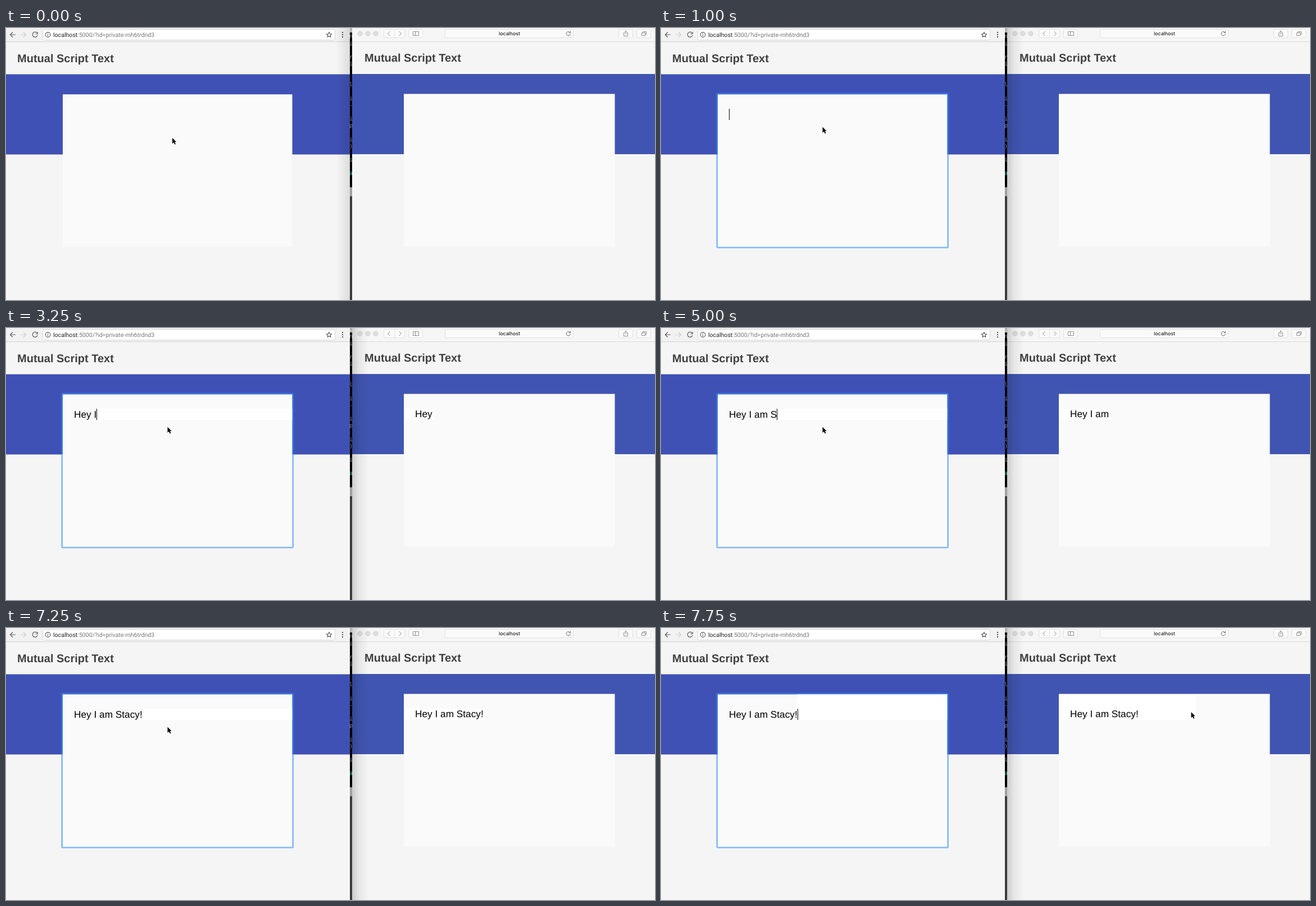
Write an HTML page that moves like this. It is 1155x485 px and loops after 8000 ms.

```html
<!DOCTYPE html>
<html lang="en">
<head>
<meta charset="utf-8">
<title>Shared editor</title>
<style>
  html, body { margin: 0; width: 100%; height: 100%; overflow: hidden; background: #f5f5f5; }
  svg { display: block; width: 1155px; height: 485px; }
  text { white-space: pre; font-kerning: none; text-rendering: geometricPrecision; }
  .title { font: bold 20px "Liberation Sans", Arial, sans-serif; fill: #404040; }
  .body { font: 17.25px "Liberation Sans", Arial, sans-serif; fill: #000; }
  .url { font: 10.6px Roboto, sans-serif; fill: #777; }
  .host { font: 500 8.7px Inter, sans-serif; fill: #222; text-anchor: middle; }
  .term { font: 10px "DejaVu Sans Mono", monospace; fill: #8a8a8a; }
  .icon { fill: none; stroke: #5f5f5f; stroke-width: 1.2; }
  .pale { stroke: #cfcfcf; }
  .thin { stroke: #8e8e8e; stroke-width: 1; }
  .button { fill: #fafafa; stroke: #e2e2e2; }
</style>
</head>
<body>
<svg viewBox="0 0 1155 485">
  <defs>
    <linearGradient id="fadeOut"><stop stop-color="#000" stop-opacity=".17"/><stop offset=".4" stop-color="#000" stop-opacity=".06"/><stop offset="1" stop-color="#000" stop-opacity="0"/></linearGradient>
    <linearGradient id="fadeIn"><stop stop-color="#000" stop-opacity="0"/><stop offset="1" stop-color="#000" stop-opacity=".1"/></linearGradient>
    <clipPath id="gap"><rect x="612" y="8" width="4" height="276"/></clipPath>
  </defs>

  <!-- left window -->
  <rect width="612" height="485" fill="#f5f5f5"/>
  <rect width="612" height="24" fill="#f2f2f2"/>
  <rect y="24" width="612" height="1" fill="#d3d3d3"/>
  <rect x="65.5" y="2.5" width="520" height="19" rx="3" fill="#fff" stroke="#d6d6d6"/>
  <path class="icon" d="M17 12H8M12 7.5L7.5 12L12 16.500"/>
  <path class="icon pale" d="M26 12H35M31 7.500L35.500 12L31 16.500"/>
  <path class="icon" d="M55.300 9A4.500 4.500 0 1 0 56 13M56.300 7V10.500H52.800"/>
  <circle class="icon" cx="74.500" cy="12" r="4.300" stroke-width="1"/>
  <path class="icon" d="M74.500 11.500V14.500M74.500 9.300V10.500"/>
  <text class="url" x="84" y="15.700"><tspan fill="#222">localhost</tspan>:5000/?id=private-mh6trdnd3</text>
  <path id="star" class="icon" stroke-linejoin="round" stroke-width="1"/>
  <g fill="#5f5f5f"><circle cx="599" cy="8" r="1.200"/><circle cx="599" cy="12" r="1.200"/><circle cx="599" cy="16" r="1.200"/></g>
  <text class="title" x="20" y="61">Mutual Script Text</text>
  <rect y="82.500" width="612" height="143" fill="#3f51b5"/>
  <rect x="101" y="118.300" width="408.500" height="272" fill="#fafafa"/>
  <rect id="leftStrip" y="144" height="20" fill="#fff"/>
  <rect id="patch" x="286" y="194" width="19" height="22" fill="#fff"/>
  <rect id="ring" x="99.700" y="117" width="411" height="274.500" rx="1.500" fill="none" stroke="#328ffa" stroke-opacity=".6" stroke-width="2.600"/>
  <text id="leftText" class="body" x="121" y="160"></text>
  <rect id="caret" y="144" width="1" height="20"/>
  <rect id="leftShade" x="588" width="24" height="485" fill="url(#fadeIn)"/>

  <!-- terminal sliver between the windows -->
  <rect x="612" width="4" height="485" fill="#3c3c3c"/>
  <rect x="612" width="4" height="8" fill="#b5b5b5"/>
  <rect x="612" y="8" width="4" height="276" fill="#000"/>
  <rect x="612" y="284" width="4" height="16" fill="#a0a0a0"/>
  <g id="term" class="term" clip-path="url(#gap)"></g>

  <!-- right window -->
  <rect x="616" width="539" height="485" fill="#f5f5f5"/>
  <rect x="616" width="539" height="24" fill="#f6f6f6"/>
  <rect x="616" y="24" width="539" height="1" fill="#dadada"/>
  <g fill="#dedede" stroke="#d2d2d2" stroke-width=".7"><circle cx="630" cy="10" r="4.300"/><circle cx="644" cy="10" r="4.300"/><circle cx="658" cy="10" r="4.300"/></g>
  <g class="button">
    <rect x="672.500" y="2.500" width="37" height="15" rx="2.500"/>
    <path d="M691.500 3V17"/>
    <rect x="716.500" y="2.500" width="25" height="15" rx="2.500"/>
    <rect x="781.500" y="2.500" width="228" height="15" rx="2.500"/>
    <rect x="1090.500" y="2.500" width="25" height="15" rx="2.500"/>
    <rect x="1122.500" y="2.500" width="25" height="15" rx="2.500"/>
  </g>
  <g class="icon thin">
    <path d="M683.500 6L679.500 10L683.500 14M699.500 6L703.500 10L699.500 14"/>
    <path d="M724.500 6.500H734.500V13.500H724.500ZM728.500 6.500V13.500"/>
    <path d="M1003.500 7.500A3.700 3.700 0 1 0 1004.500 10.500M1004.500 5.500V8.500H1001.500" stroke="#666"/>
    <path d="M1101.500 8.500H1099.500V14.500H1106.500V8.500H1104.500M1103 11.500V5M1101 6.800L1103 4.800L1105 6.800"/>
    <path d="M1131.500 8.500H1137.500V13.500H1131.500ZM1133.500 8.500V6.500H1139.500V11.500H1137.500"/>
  </g>
  <text class="host" x="896" y="13.300">localhost</text>
  <text class="title" x="638" y="60">Mutual Script Text</text>
  <rect x="616" y="82" width="539" height="143" fill="#4055b1"/>
  <rect x="708" y="117.500" width="375.500" height="272" fill="#fafafa"/>
  <rect id="rightStrip" x="708" y="144" height="20" fill="#fff"/>
  <text id="rightText" class="body" x="728" y="159"></text>
  <rect id="rightShade" x="616" width="30" height="485" fill="url(#fadeOut)"/>

  <path id="pointer" d="M0 0V10.200L2.400 8L4.200 11.800L5.900 11L4.200 7.300H7.200Z" stroke="#fff" stroke-width="1" paint-order="stroke"/>
</svg>
<script>
const LOOP = 8000;
const LINE = "Hey I am Stacy!";
// Moment at which each letter shows in either window
const TYPED = [1750, 2250, 2500, 2750, 3250, 3750, 4000, 4250, 4500, 5000, 5250, 5500, 5750, 6250, 6750];
const SYNCED = [2000, 2500, 2750, 3250, 3500, 4000, 4250, 4500, 5000, 5250, 5500, 5750, 6000, 6500, 7000];
const POINTER = [[0, 296, 196], [250, 295, 198], [500, 292, 197], [750, 287.500, 176.500], [7500, 700, 108], [7750, 943.500, 150]];

const $ = id => document.getElementById(id);
const show = (id, on) => $(id).setAttribute("visibility", on ? "visible" : "hidden");
const set = (id, attrs) => { for (const k in attrs) $(id).setAttribute(k, attrs[k]); };
const between = (t, a, b) => t >= a && t < b;

function write(id, times, t) {
  const count = times.filter(at => at <= t).length;
  const el = $(id);
  el.textContent = LINE.slice(0, count).replace(/ /g, "\u00a0");
  return count ? el.getComputedTextLength() : 0;
}

function draw(t) {
  const late = t >= 7750;
  const end = 121 + write("leftText", TYPED, t);
  const echo = 728 + write("rightText", SYNCED, t);
  const top = late ? 118 : 144;

  set("caret", { x: Math.round(end) });
  show("caret", between(t, 1000, 1500) || between(t, 1750, 7250) || late);
  set("leftStrip", { x: end, width: 509.500 - end, y: top, height: 164 - top });
  show("leftStrip", t >= TYPED[0]);
  set("rightStrip", { width: (late ? 952 : echo) - 708, y: top, height: 164 - top });
  show("rightStrip", t >= SYNCED[0]);

  show("ring", t >= 1000);
  show("patch", between(t, 750, 1000));
  show("leftShade", t < 500);
  show("rightShade", t >= 500);

  const [, x, y] = POINTER.filter(p => p[0] <= t).pop();
  set("pointer", { transform: `translate(${x} ${y})` });
}

const points = Array.from({ length: 10 }, (_, i) => {
  const r = i % 2 ? 2.200 : 5, a = i * Math.PI / 5;
  return (575 + r * Math.sin(a)).toFixed(2) + " " + (12.300 - r * Math.cos(a)).toFixed(2);
});
set("star", { d: "M" + points.join("L") + "Z" });

const rows = [18, 31, 55, 67, 104, 129, 141, 165, 177, 202, 214, 238, 262];
$("term").innerHTML = rows.map((y, i) =>
  `<text x="611" y="${y}"${i === 12 ? ' fill="#2fb5a0" style="fill:#2fb5a0"' : ""}>${"nirili-ipi)iat"[i]}</text>`).join("");

const start = performance.now();
function tick() {
  draw((performance.now() - start) % LOOP);
  requestAnimationFrame(tick);
}
tick();
</script>
</body>
</html>
```
